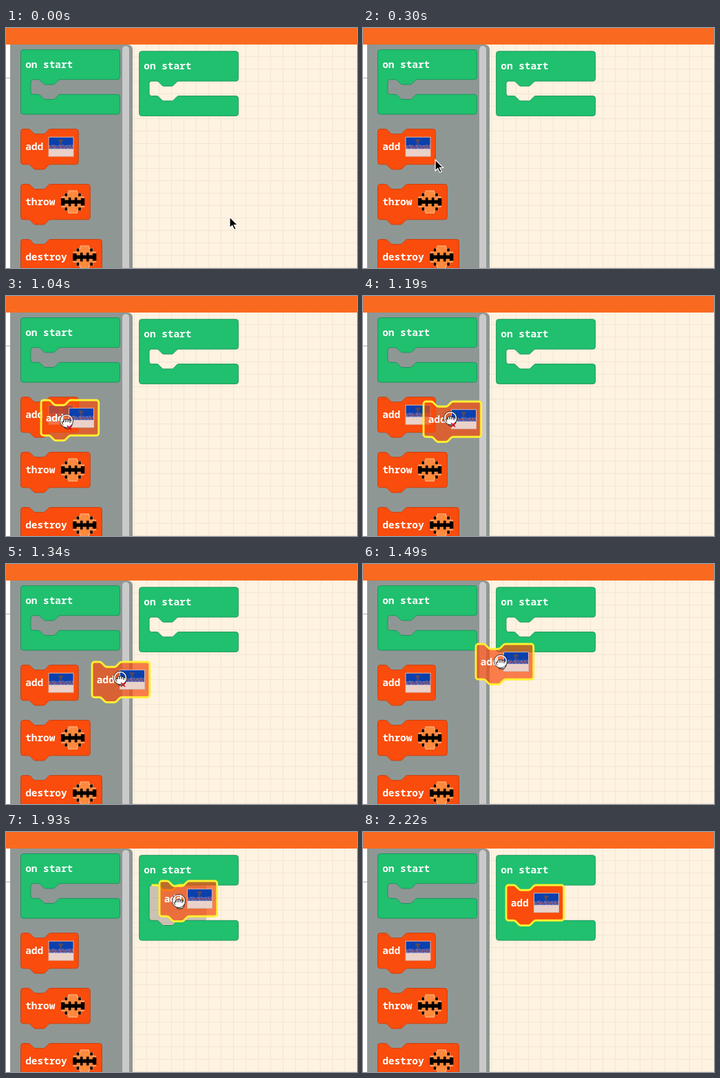
These frames come from a looping animation (510x348 px, 4220 ms). An HTML page:

```html
<!DOCTYPE html>
<html lang="en">
<head>
<meta charset="utf-8">
<title>Dragging a block</title>
<style>
  html, body { margin: 0; width: 100%; height: 100%; overflow: hidden; background: #fef2e0; }
  svg { display: block; width: 510px; height: 348px; }
  text { font: 600 16px "Noto Sans Mono", "DejaVu Sans Mono", monospace; fill: #fff; white-space: pre; }
  .green { fill: #20c06e; stroke: #18935a; }
  .orange { fill: #fa4c0c; stroke: #c4400f; }
  .lit { stroke: #fff032; stroke-width: 3.2; }
  .lifted .orange { fill-opacity: .7; }
</style>
</head>
<body>
<svg viewBox="0 0 510 348">
  <defs>
    <pattern id="grid" x="204" y="41" width="18" height="18" patternUnits="userSpaceOnUse">
      <path d="M.5 0V18M0 .5H18" stroke="#f3e6d3" fill="none"/>
    </pattern>
    <g id="scene">
      <rect width="40" height="31" fill="#0a40ae"/>
      <rect y="18" width="40" height="13" fill="#ead2ca"/>
      <path d="M0 13h5v-1h6v2h5v-2h9v1h6v-1h9v7H0z" fill="#3d4fa6"/>
      <path d="M1 16h38" stroke="#b5544f" stroke-width="2" stroke-dasharray="3 2 1 2"/>
      <path d="M0 14h40M2 18h37" stroke="#8f8fc5" stroke-dasharray="2 3 4 2"/>
      <path d="M16 4h7v3h-2v5h-3V7h-2z" fill="#5b4a55"/>
      <rect width="40" height="31" fill="none" stroke="#dcc0b2"/>
    </g>
    <g id="bug">
      <path d="M-7-18H7v4h6v6h5V8h-5v6H7v4H-7v-4h-6V8h-5V-8h5v-6h6z" fill="#ff8a3d" stroke="#ffc79b"/>
      <path d="M-13-14h4v5h-4zM9-14h4v5H9zM-13 9h4v5h-4zM9 9h4v5H9z
               M-19-6h6v3h6v-4h4v4h6v-4h4v4h6v-3h6V6h-6V3H7v4H3V3h-6v4h-4V3h-6v3h-6z"/>
    </g>
    <path id="arrow" d="M0 0V16l3.7-3.5 3 6 2.6-1.2-2.9-5.8H11.5z" stroke="#fff" stroke-width="1.2"/>
    <path id="fist" d="M-6 1C-7-2-5-2-4-1V-4c1-2 3-1 3 0 0-2 3-2 3 0 1-1 3-1 3 1 1-1 3 0 3 2V2C8 5 6 6 5 8H-2C-3 5-5 4-6 1zM-1-4v3M2-4v3M5-3v3"
          fill="#fff" stroke="#000"/>
    <path id="palm" d="M-7 1c0-2 2-2 3 0L-5-5c0-2 2-2 3 0l1 3V-7c0-2 3-2 3 0v5l1-4c1-2 3-1 3 1L5-1l1-2c1-1 2 0 2 1C7 4 6 5 5 9H-2C-3 6-6 4-7 1z"
          fill="#fff" stroke="#000"/>
  </defs>

  <rect width="510" height="348" fill="#fef2e0"/>
  <rect x="184" y="24" width="326" height="324" fill="url(#grid)"/>
  <rect y="24" width="6" height="324" fill="#fff"/>
  <path d="M0 72.5H6" stroke="#b4b4b4"/>
  <path d="M6 348V24H176q8 0 8 8V348z" fill="#8f9795"/>
  <path d="M169 348V31a5 5 0 0 1 10 0V348z" fill="#cacaca"/>
  <rect width="510" height="24" fill="#f96a20"/>
  <g id="tools"></g>
  <g id="work"></g>
  <g id="cursor"></g>
</svg>
<script>
const el = id => document.getElementById(id);

// Puzzle tabs, drawn rightwards and leftwards
const tab = "c2 0 3 1 4 2l4 4c1 1 2 2 4 2h12c2 0 3-1 4-2l4-4c1-1 2-2 4-2";
const tabBack = "c-2 0-3 1-4 2l-4 4c-1 1-2 2-4 2h-12c-2 0-3-1-4-2l-4-4c-1-1-2-2-4-2";

const at = (x, y, body, cls = "") =>
  `<g class="${cls}" transform="translate(${x} ${y}) scale(.9)">${body}</g>`;

const shape = w => `M0 4a4 4 0 0 1 4-4H12${tab}H${w - 4}a4 4 0 0 1 4 4V53a4 4 0 0 1-4 4H48${tabBack}H4a4 4 0 0 1-4-4z`;

const start = gap => `<path class="green" d="M0 4a4 4 0 0 1 4-4H156a4 4 0 0 1 4 4V44a4 4 0 0 1-4 4H64${tabBack}
  h-8a4 4 0 0 0-4 4v${gap - 8}a4 4 0 0 0 4 4h8${tab}H156a4 4 0 0 1 4 4v24a4 4 0 0 1-4 4H4a4 4 0 0 1-4-4z"/>
  <text x="7.4" y="29.5">on start</text>`;

const command = (word, w, icon, lit) => `<path class="orange ${lit ? "lit" : ""}" d="${shape(w)}"/>
  <text x="7.4" y="34">${word}</text>${icon}`;

const add = lit => command("add", 93, '<use href="#scene" x="45" y="13"/>', lit);
const bugBlock = (word, w) => command(word, w, `<use href="#bug" x="${w - 28}" y="28.5"/>`);

const marker = at(208, 77, `<path d="${shape(93)}" opacity=".2"/>
  <path d="M4 0H12${tab}h8" fill="none" class="lit"/>`);

const ring = `<circle r="8.6" fill="none" stroke="#fff" stroke-width="1.8"/>
  <circle r="9.6" fill="none" stroke="#222" stroke-width=".9"/>`;
const fist = '<use href="#fist" y="3"/>';
const cross = '<path d="M1 7l6 6m0-6l-6 6" stroke="#e01020" stroke-width="1.6"/>';
const cursors = {
  arrow: '<use href="#arrow"/>',
  press: '<use href="#arrow" x="-1.5" y="1"/>' + ring,
  bin: fist + ring + cross,
  grab: fist + ring,
  open: '<use href="#palm"/>',
  none: ""
};

// start time, cursor, cursor x y, shift of the dragged block
const poses = [
  [0, "arrow", 325, 274],
  [150, "arrow", 208, 227],
  [300, "arrow", 105, 191],
  [450, "arrow", 67, 174],
  [600, "arrow", 47.5, 176],
  [740, "press", 49, 175],
  [890, "press", 54.5, 176],
  [1040, "bin", 88, 181, 30, 5],
  [1190, "bin", 127, 177, 67, 7],
  [1340, "bin", 166, 165, 104, -4],
  [1490, "grab", 200, 141, 143, -30],
  [1640, "grab", 225, 120, 175, -55],
  [1790, "grab", 239, 109, 190, -66],
  [1930, "grab", 251, 100, 202, -75],
  [2080, "open", 255, 120, 187, -69],
  [2220, "none", 0, 0, 187, -69]
];
const loop = 4220;
let shown;

function draw(pose) {
  const [time, kind, x, y, dx, dy] = pose;
  const hover = time >= 450 && time < 1040;
  const near = time >= 1640, dropped = time >= 2080;

  el("tools").innerHTML = at(21.5, 31.5, start(24)) + at(21.5, 146.5, add(hover))
    + at(21.5, 226.5, bugBlock("throw", 112)) + at(21.5, 306.5, bugBlock("destroy", 131));

  el("work").innerHTML = at(193.6, 33.8, start(near ? 57 : 24))
    + (near && !dropped ? marker : "")
    + (dx === undefined ? "" : at(21 + dx, 146 + dy, add(true), dropped ? "" : "lifted"));

  el("cursor").innerHTML = `<g transform="translate(${x} ${y})">${cursors[kind]}</g>`;
}

function tick() {
  const t = performance.now() % loop;
  const pose = poses.findLast(p => p[0] <= t);
  if (pose !== shown) draw(shown = pose);
  requestAnimationFrame(tick);
}
tick();
</script>
</body>
</html>
```
